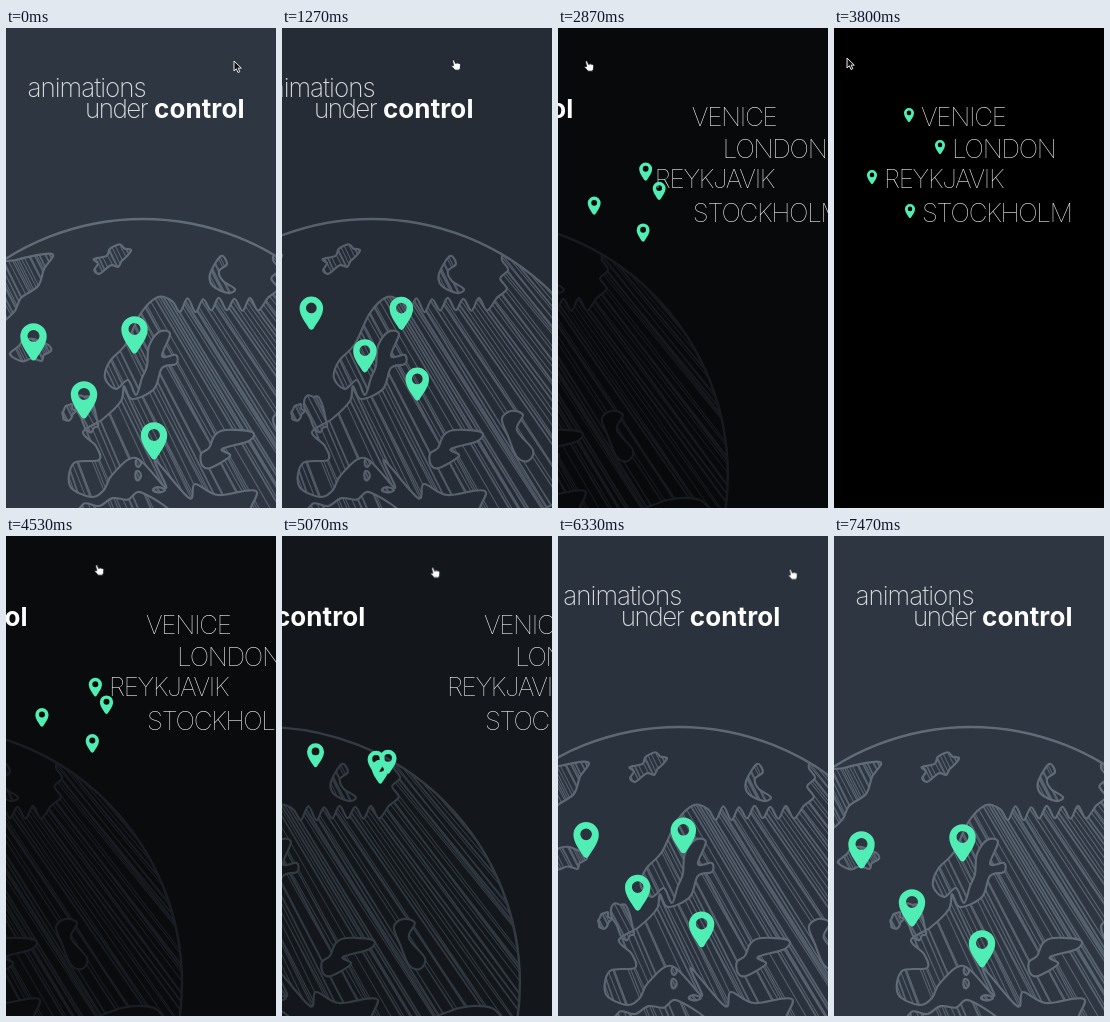
Write an HTML page that moves like this. It is 270 px wide and 480 px high and loops after 7.87 s.

```html
<!DOCTYPE html>
<html lang="en">
<head>
<meta charset="utf-8">
<title>Animations under control</title>
<style>
@property --p { syntax: "<number>"; inherits: true; initial-value: 0; }

html, body { margin: 0; width: 100%; height: 100%; overflow: hidden; }

body {
  --q: calc(1 - var(--p));
  background: rgb(calc(45 * var(--q)) calc(53.5 * var(--q)) calc(64.5 * var(--q)));
  animation: drag 7870ms linear infinite;
}
svg { display: block; width: 100vw; height: 100vh; }

#page { transform: translateX(calc(var(--p) * -270px)); }
#globe { opacity: var(--q); fill: none; stroke: #626c78; stroke-linejoin: round; }
.coast { stroke-width: 2.1; }
.hatch { stroke: #59636f; }

text { fill: #fff; font: 200 26px Inter, "Open Sans", sans-serif; }
.light { fill-opacity: .82; letter-spacing: -1px; }
.tight { letter-spacing: -1.5px; }
.bold { font-weight: 700; letter-spacing: .1px; }
.city { font-weight: 100; letter-spacing: -1.3px; }

.pin {
  fill: #50eeb4;
  fill-rule: evenodd;
  transform:
    translate(calc((var(--x0) * var(--q) + var(--x1) * var(--p)) * 1px),
              calc((var(--y0) * var(--q) + var(--y1) * var(--p)) * 1px))
    scale(calc(1 - .62 * var(--p)));
}

#cursor { animation: point 7870ms linear infinite; }
#arrow { animation: arrow 7870ms step-end infinite; }
#hand { opacity: 0; animation: hand 7870ms step-end infinite; }

/* page position, 0 = first page, 1 = second page */
@keyframes drag {
  0%, 10.2% { --p: 0; }
  16.14% { --p: .174; }
  17.8%, 19.5% { --p: .23; }
  27.06% { --p: .552; }
  28.8%, 31.3% { --p: .615; }
  36.47% { --p: .826; animation-timing-function: cubic-bezier(.3, .4, .6, 1); }
  41.55%, 50.86% { --p: 1; }
  57.56% { --p: .804; }
  71.16%, 73.74% { --p: .35; }
  74.59% { --p: .333; animation-timing-function: cubic-bezier(.3, .35, .6, 1); }
  83.86%, 100% { --p: 0; }
}
@keyframes point {
  0%, .9% { transform: translate(231px, 38px); }
  10.2% { transform: translate(224px, 37px); }
  17.8%, 19.5% { transform: translate(160px, 37px); }
  28.8%, 31.3% { transform: translate(67px, 37px); }
  36.47% { transform: translate(31px, 38px); }
  45.7%, 50.86% { transform: translate(16px, 35px); }
  57.56% { transform: translate(93px, 34px); }
  71.16%, 74.59% { transform: translate(212px, 39px); }
  83.86% { transform: translate(248px, 38px); }
  90%, 100% { transform: translate(242px, 21px); }
}
@keyframes arrow {
  0%, 42.3%, 83.86% { opacity: 1; }
  10.2%, 48.3%, 90% { opacity: 0; }
}
@keyframes hand {
  10.2%, 48.3% { opacity: 1; }
  42.3%, 83.86% { opacity: 0; }
}
</style>
</head>
<body>
<svg viewBox="0 0 270 480">
  <defs>
    <clipPath id="ball"><circle cx="137" cy="447" r="256"/></clipPath>
    <clipPath id="mainland"><path clip-rule="evenodd"/></clipPath>
    <clipPath id="islands"><path/></clipPath>
    <path id="marker" d="M-2.6-1C-6-7-13.2-15-13.2-23.6A13.2 13.2 0 0 1 13.2-23.6C13.2-15 6-7 2.6-1Q0 2-2.6-1ZM-6-24a6 6 0 1 0 12 0a6 6 0 1 0-12 0Z"/>
  </defs>
  <g id="page">
    <g id="globe">
      <circle cx="137" cy="447" r="256" stroke-width="2.4"/>
      <g id="land" clip-path="url(#ball)"></g>
    </g>
    <text class="light" x="21.5" y="69">animations</text>
    <text class="light tight" x="79" y="90">under</text>
    <text class="bold" x="148" y="90">control</text>
  </g>
  <g id="pins"></g>
  <g id="cursor">
    <path id="arrow" d="M-3-5V5L-.7 2.8L1 6.5L2.8 5.7L1.2 2.1H4.3Z" fill="#111" stroke="#e8eaec"/>
    <path id="hand" d="M-3.6-4.6Q-2.4-5.8-1.4-4.2L-.4-1.6L1.2-2.2L3.6-1.4L4.8-.4L4.4 3.2L3.4 5.2H-1L-4.4 1.2Q-4.4-.2-2.4.6Z" fill="#fff" stroke="#15191e" stroke-width=".9"/>
  </g>
</svg>
<script>
const NS = "http://www.w3.org/2000/svg";
const find = s => document.querySelector(s);

function add(parent, tag, attrs, text = "") {
  const el = document.createElementNS(NS, tag);
  for (const k in attrs) el.setAttribute(k, attrs[k]);
  el.textContent = text;
  find(parent).append(el);
}

// label position, then the pin's place on the globe
const cities = [
  ["VENICE", 357, 98, 148, 431],
  ["LONDON", 388, 130, 78, 390],
  ["REYKJAVIK", 320, 160, 27.5, 332],
  ["STOCKHOLM", 358, 194, 128.5, 325]
];
for (const [name, x, y, px, py] of cities) {
  add("#page", "text", { class: "city", x, y }, name);
  add("#pins", "use", {
    class: "pin", href: "#marker",
    style: `--x0:${px};--y0:${py};--x1:${x - 282};--y1:${y - 4}`
  });
}

let seed = 11;
const rnd = () => (seed = seed * 16807 % 2147483647) / 2147483647;
const spread = n => (rnd() * 2 - 1) * n;
const points = s => s.split(" ").map(p => p.split(",").map(Number));

// closed smooth curve through the points
function loop(pts) {
  const n = pts.length;
  const at = i => pts[(i + n) % n];
  let d = "M" + pts[0];
  for (let i = 0; i < n; i++) {
    const [a, b, c, e] = [at(i - 1), at(i), at(i + 1), at(i + 2)];
    const out = [0, 1].map(k => b[k] + (c[k] - a[k]) / 6);
    const into = [0, 1].map(k => c[k] - (e[k] - b[k]) / 6);
    d += `C${out} ${into} ${c}`;
  }
  return d + "Z";
}

// coast with n bays between two points
function bays(x0, y0, x1, y1, n, depth) {
  const len = Math.hypot(x1 - x0, y1 - y0);
  return Array.from({ length: n }, (_, i) => {
    const k = i / (n - 1), off = (i % 2 ? 1 : -1) * depth * (.6 + rnd() * .4);
    return [x0 + (x1 - x0) * k + off * (y0 - y1) / len,
            y0 + (y1 - y0) * k + off * (x1 - x0) / len];
  });
}

// uneven ellipse, tilted by a degrees
function isle(cx, cy, rx, ry, a = 0, rough = .25) {
  const n = rx + ry > 12 ? 13 : 6, tilt = a * Math.PI / 180;
  return Array.from({ length: n }, (_, i) => {
    const t = i / n * 2 * Math.PI, r = 1 + spread(rough);
    const u = rx * r * Math.cos(t), v = ry * r * Math.sin(t);
    return [cx + u * Math.cos(tilt) - v * Math.sin(tilt),
            cy + u * Math.sin(tilt) + v * Math.cos(tilt)];
  });
}

const europe = [
  ...bays(272, 222, 266, 270, 6, 5),
  ...bays(252, 276, 166, 278, 12, 8),
  ...points("152,269 135,285 120,316 104,333 99,350 110,361 122,352 130,367 136,350 141,338 143,318 153,304 164,306 156,328 170,327 170,336 156,340 148,361 126,371 118,358 115,373 97,391 77,404 90,418 93,432 68,435 64,458 85,469 98,462 106,447 130,430 160,460 149,432 183,470 189,456 212,467 250,463 246,490"),
  ...points("300,510 430,510 430,190 330,190")
];
const seas = [
  points("196,437 195,426 203,420 209,407 220,402 246,404 243,413 216,421 224,428 204,440"),
  points("267,391 276,383 288,387 282,402 298,422 293,433 282,429 273,408"),
  isle(345, 484, 34, 14, 0, .1)
];
const africa = [...bays(78, 478, 136, 467, 5, 3), [165, 490], [76, 495]];
const isles = [
  points("-8,240 10,232 46,226 38,241 32,258 15,270 8,284 -8,292"),
  points("215,228 221,236 213,243 217,253 229,261 222,265 207,258 204,246"),
  isle(24, 323, 17, 10),
  isle(106, 231, 17, 9, -25, .4),
  isle(80, 382, 8, 20, -22),
  isle(62, 385, 6, 8, 20),
  isle(132, 435, 2.5, 3.5),
  isle(132, 448, 3, 4.5),
  isle(153, 462, 5, 3)
];

// pen strokes; lean(x) is how far a stroke drifts on its way down
function hatch(clip, lean) {
  const strokes = [[], []];
  for (let x = -400; x < 420; x += 2 + rnd() * 2.6) {
    const end = x + lean(x) + spread(9);
    const mid = (x + end) / 2 + spread(3);
    strokes[rnd() < .35 ? 1 : 0].push(`M${x} 190Q${mid} 340 ${end} 490`);
  }
  strokes.forEach((s, i) => add("#land", "path", {
    d: s.join(""), class: "hatch", "clip-path": `url(#${clip})`, "stroke-width": 1.1 + i * .7
  }));
}

const main = [europe, ...seas, africa].map(loop).join("");
const small = isles.map(loop).join("");
find("#mainland path").setAttribute("d", main);
find("#islands path").setAttribute("d", small);
hatch("mainland", x => Math.max(90, 125 + x / 2));
hatch("islands", () => 150);
add("#land", "path", { d: main + small, class: "coast" });
</script>
</body>
</html>
```
